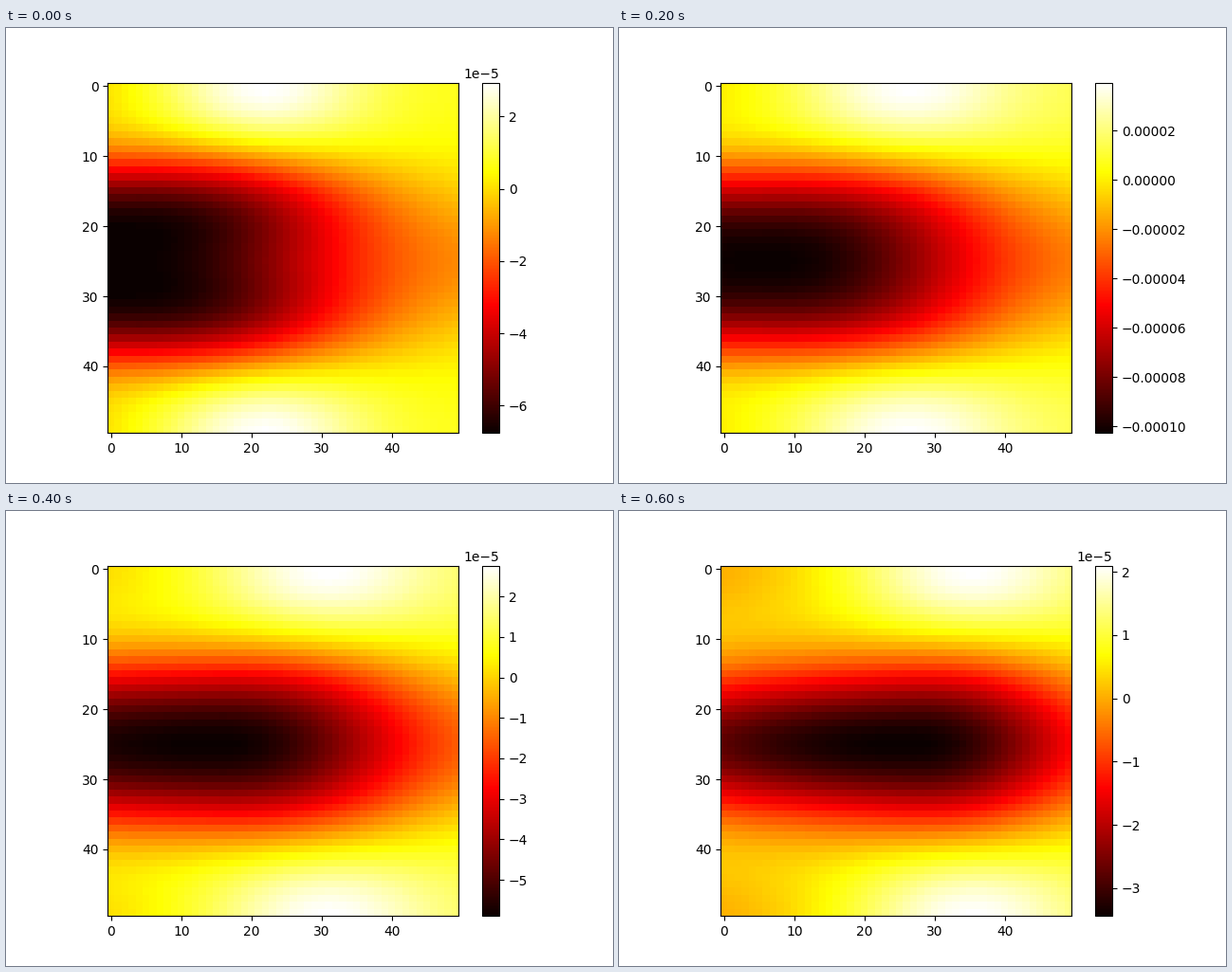
A matplotlib script for the animation above (620 ms loop, 640 px wide and 480 px high).

```python
import numpy as np
import matplotlib.pyplot as plt
from matplotlib.animation import FuncAnimation
from matplotlib.ticker import ScalarFormatter

SIZE = 50
FRAMES = 31
STEP_MS = 20

# Key points of the colour range: frame, lowest and highest value in 1e-5
KEYS = np.array([0, 7, 12, 16, 20, 24, 30]) / (FRAMES - 1)
LOW_FIT = np.polyfit(KEYS, [-6.76, -10.48, -9.63, -7.75, -5.89, -4.60, -3.44], 6)
HIGH_FIT = np.polyfit(KEYS, [2.94, 4.09, 3.73, 3.20, 2.76, 2.43, 2.10], 6)

X = np.arange(SIZE)
Z = X / (SIZE - 1)
# The field is periodic from top to bottom; the angle is 0 on the middle line.
ANGLE = 2 * np.pi * (np.arange(SIZE)[:, None] - SIZE / 2) / SIZE


def edge_line(t):
    """Bright crest along the top and bottom, travelling right."""
    base = 0.66 + 0.10 * Z - 0.04 * t + 0.06 * np.sin(np.pi * t)
    crest = np.exp(-((X - 22 - 13.5 * t) / (16 + 2.5 * t)) ** 2)
    return base + (1 - base) * crest


def middle_line(t):
    """Dark trough along the middle line, steeper on its right side."""
    d = X - (3 + 7 * t + 16.5 * t ** 2)
    width = np.where(d < 0, 75 - 24 * t, 30 - 6.5 * t ** 2)
    return 0.61 * (1 - np.exp(-(np.abs(d) / width) ** 2.3))


def shape(t):
    """Field scaled to 0..1, built from vertical cosine modes."""
    edge, middle = edge_line(t), middle_line(t)
    quarter = (0.33 + 0.44 * t - 0.225 * t ** 2
               + (0.65 - 0.6 * t + 0.3 * t ** 2) * middle)
    mean = (middle + edge + 2 * quarter) / 4
    first = (middle - edge) / 2
    second = (middle + edge - 2 * quarter) / 4
    sharp = 0.05 * (1 - t) * (1 - Z)
    return (mean + first * np.cos(ANGLE) + second * np.cos(2 * ANGLE)
            + sharp * (np.cos(3 * ANGLE) - np.cos(ANGLE)))


def field(frame):
    t = frame / (FRAMES - 1)
    low = np.polyval(LOW_FIT, t) * 1e-5
    high = np.polyval(HIGH_FIT, t) * 1e-5
    return low + (high - low) * shape(t), low, high


class BarFormatter(ScalarFormatter):
    """Scientific labels only while the visible range stays under 1e-4."""

    def _set_order_of_magnitude(self):
        largest = np.abs(self.axis.get_view_interval()).max()
        self.orderOfMagnitude = -5 if largest < 1e-4 else 0


fig, ax = plt.subplots(figsize=(6.4, 4.8), dpi=100)
data, low, high = field(0)
image = ax.imshow(data, cmap="hot", vmin=low, vmax=high)
fig.colorbar(image, ax=ax, format=BarFormatter())


def update(frame):
    data, low, high = field(frame)
    image.set_data(data)
    image.set_clim(low, high)
    return [image]


anim = FuncAnimation(fig, update, frames=FRAMES, interval=STEP_MS,
                     repeat=True, repeat_delay=0, blit=False)
plt.show()
```
